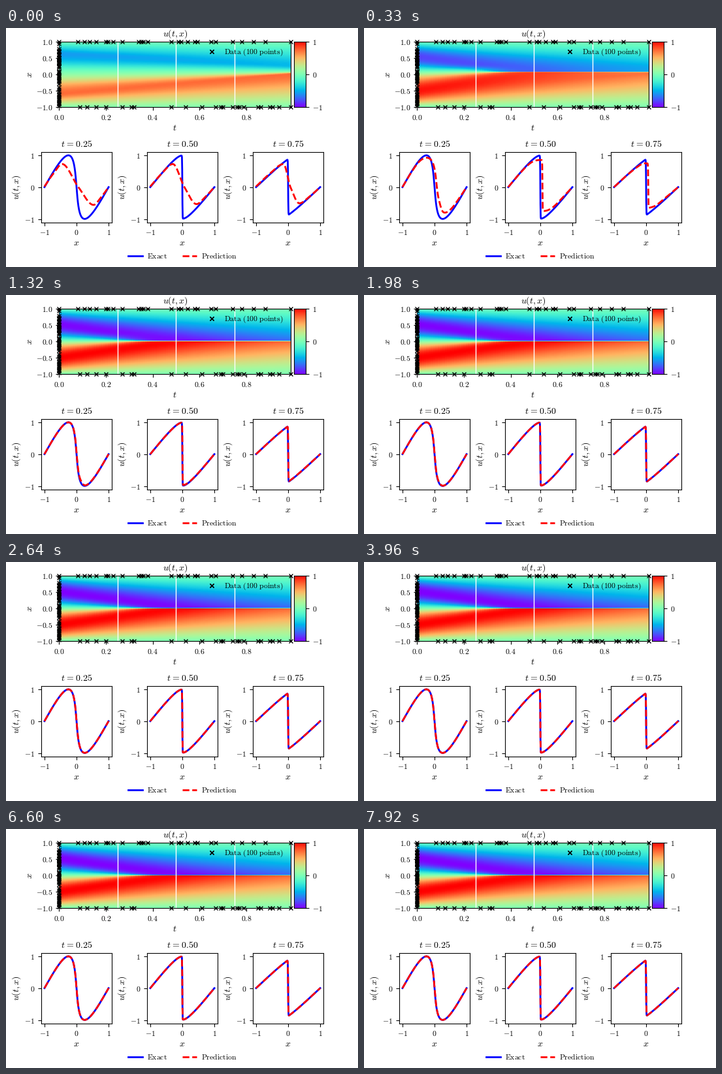
Animation, 539 px wide and 366 px high, one loop 8 s. Source, as a matplotlib script:

```python
import numpy as np
import matplotlib.pyplot as plt
from matplotlib.animation import FuncAnimation
from matplotlib.lines import Line2D

W, H, DPI = 539, 366, 100
LOOP, TICK, HOLD = 8000, 80, 330
STEPS = 25
SMALL, NORMAL = 8.4, 10
NU = 0.01 / np.pi

plt.rcParams["mathtext.fontset"] = "cm"

T = np.linspace(0, 0.99, 100)
X = np.linspace(-1, 1, 256)
FINE = np.linspace(-1.2, 1.2, 1201)


def burgers(t, x):
    """Cole-Hopf solution of Burgers' equation with u(0, x) = -sin(pi x)."""
    if t == 0:
        return -np.sin(np.pi * x)
    z, w = np.polynomial.hermite.hermgauss(100)
    y = x[:, None] - np.sqrt(4 * NU * t) * z
    f = w * np.exp(-np.cos(np.pi * y) / (2 * np.pi * NU))
    return -(np.sin(np.pi * y) * f).sum(1) / f.sum(1)


def smooth_curve(xk, yk, x):
    """Monotone cubic through the knots."""
    h, d = np.diff(xk), np.diff(yk) / np.diff(xk)
    m = np.zeros(len(xk))
    m[0], m[-1] = d[0], d[-1]
    same = d[:-1] * d[1:] > 0
    m[1:-1][same] = 2 * (d[:-1] * d[1:])[same] / (d[:-1] + d[1:])[same]
    i = np.clip(np.searchsorted(xk, x) - 1, 0, len(h) - 1)
    s = (x - xk[i]) / h[i]
    return (yk[i] * (1 + 2 * s) * (1 - s) ** 2 + yk[i + 1] * s * s * (3 - 2 * s)
            + h[i] * (m[i] * s * (1 - s) ** 2 - m[i + 1] * s * s * (1 - s)))


def first_guess(t):
    """Barely trained profile: a crest and a trough drifting together."""
    crest, zero, trough = -0.6 + 0.61 * t, 0.05 + 0.03 * t, 0.62 - 0.36 * t
    low = -0.58 + 0.1 * t
    xk = np.array([-1, (crest - 1) / 2, crest, zero, trough, (trough + 1) / 2, 1])
    uk = np.array([0.02, 0.42, 0.72, 0, low, 0.57 * low, 0])
    return smooth_curve(xk, uk, X)


TABLE = [burgers(t, FINE) for t in T]
EXACT = np.array([np.interp(X, FINE, row) for row in TABLE])
GUESS = np.array([first_guess(t) for t in T])


def prediction(k):
    """Network output after k training steps, converging on the solution."""
    shift = 0.16 * 0.42 ** k + 0.001 * np.sin(2.4 * k)
    xs = X - shift * np.exp(-(X / 0.4) ** 2)
    u = np.array([np.interp(xs, FINE, row) for row in TABLE])
    u = np.where(u < 0, u * (1 - 0.24 * 0.5 ** k), u)
    bump = np.exp(-((X - 0.14) / 0.08) ** 2) * np.exp(-((T[:, None] - 0.25) / 0.12) ** 2)
    u = u + 0.25 * 0.65 ** k * bump
    mix = 0.15 ** k
    return mix * GUESS + (1 - mix) * u


FIELDS = [prediction(k) for k in range(STEPS)]


def sample_points(count=100, inner=10000):
    """Random picks from the initial line and both edges, as (t, x)."""
    rng = np.random.RandomState(1234)
    # the interior collocation points use up the first draws
    rng.rand(inner, 2)
    for _ in range(2):
        rng.permutation(inner)
    t = np.concatenate([0 * X, T, T])
    x = np.concatenate([X, 0 * T - 1, 0 * T + 1])
    pick = rng.choice(len(t), count, replace=False)
    return t[pick], x[pick]


fig = plt.figure(figsize=(W / DPI, H / DPI), dpi=DPI, facecolor="white")


def box(x, y, w, h):
    """Axes placed in pixels from the top left corner."""
    return fig.add_axes([x / W, 1 - (y + h) / H, w / W, h / H])


def label(x, y, s, size=NORMAL, **kw):
    kw = {"ha": "center", "va": "center", **kw}
    fig.text(x / W, 1 - y / H, f"${s}$", fontsize=size, **kw)


def key(x0, x1, y, **kw):
    fig.add_artist(Line2D([x0 / W, x1 / W], [1 - y / H] * 2, **kw))


def ticks(axis, values, fmt):
    axis.set_ticks(values, [f"${v:{fmt}}$" for v in values], fontsize=SMALL)


# Solution map
top = box(81, 21.02, 355.24, 100.31)
look = dict(cmap="rainbow", vmin=-1, vmax=1, origin="lower",
            aspect="auto", interpolation="nearest")
heat = top.imshow(FIELDS[0].T, extent=[0, 0.99, -1, 1], **look)
ticks(top.xaxis, np.arange(5) / 5, ".1f")
ticks(top.yaxis, np.linspace(-1, 1, 5), ".1f")
for t in (0.25, 0.5, 0.75):
    top.plot([t, t], [-1, 1], "w-", lw=1)
top.plot(*sample_points(), "kx", ms=4, clip_on=False)
top.set_xlim(0, 0.99)
top.set_ylim(-1, 1)

key(315.3, 315.3, 36, color="k", marker="x", ms=4, ls="none")
label(334, 37, r"\mathrm{Data\ (100\ points)}", SMALL, ha="left")
label(259, 9, "u(t,x)")
label(258.5, 153, "t")
label(36, 71.2, "x", rotation=90)

# Colour bar
bar = box(441.24, 21.02, 17.76, 100.31)
bar.imshow(np.linspace(-1, 1, 256)[:, None], extent=[0, 1, -1, 1], **look)
bar.set_xticks([])
bar.yaxis.tick_right()
ticks(bar.yaxis, [-1, 0, 1], "d")

# Time slices
slices = []
for n, i in enumerate((25, 50, 75)):
    left = 54 + 162 * n
    ax = box(left, 189.67, 108, 108)
    ax.plot(X, EXACT[i], "b-", lw=2)
    line, = ax.plot(X, FIELDS[0][i], "r--", lw=2)
    slices.append((i, line))
    ax.set_xlim(-1.1, 1.1)
    ax.set_ylim(-1.1, 1.1)
    ticks(ax.xaxis, [-1, 0, 1], "d")
    ticks(ax.yaxis, [-1, 0, 1], "d")
    label(left + 54, 177.5, rf"t\hspace{{0.08}}=\hspace{{0.08}}{T[i]:.2f}")
    label(left + 54, 329, "x")
    label(left - 37.5, 244, "u(t,x)", rotation=90)

key(187, 208.5, 349.3, color="b", lw=2)
label(216.3, 349.6, r"\mathrm{Exact}", SMALL, ha="left")
key(269.7, 292, 349.3, color="r", lw=2, ls="--")
label(299.3, 349.6, r"\mathrm{Prediction}", SMALL, ha="left")


def update(n):
    k = min((n * TICK + TICK - 1) // HOLD, STEPS - 1)
    heat.set_data(FIELDS[k].T)
    for i, line in slices:
        line.set_ydata(FIELDS[k][i])
    return [heat] + [line for _, line in slices]


anim = FuncAnimation(fig, update, frames=LOOP // TICK, interval=TICK,
                     repeat=True, repeat_delay=0, blit=False)
plt.show()
```
